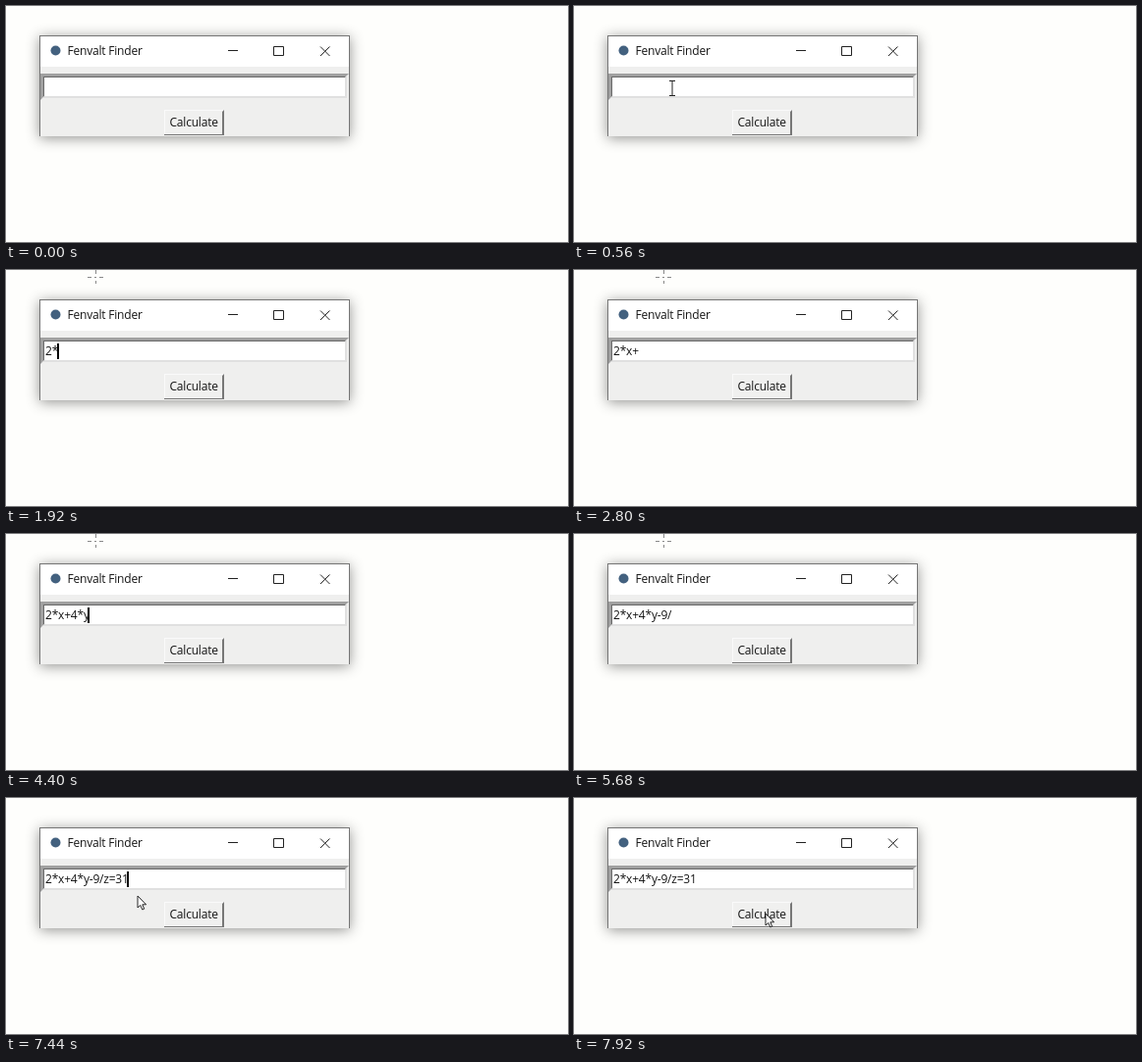
These frames come from a looping animation (572 by 241 pixels, 8000 ms). An HTML page:

```html
<!DOCTYPE html>
<html lang="en">
<head>
<meta charset="utf-8">
<title>Equation window</title>
<style>
  html, body { margin: 0; width: 100%; height: 100%; overflow: hidden; background: #fefefc; }
  svg { display: block; width: 572px; height: 241px; }
  text { font: 12px "Open Sans", "Noto Sans", sans-serif; letter-spacing: -.2px; fill: #151515; white-space: pre; }
  .label { font-weight: 500; }
  .shadow { filter: drop-shadow(0 2px 7px rgba(0, 0, 0, .42)); }
  .line { fill: none; stroke: #222; }
</style>
</head>
<body>
<svg viewBox="0 0 572 241">
  <!-- window -->
  <rect class="shadow" x="34" y="30" width="316" height="103" fill="#757575"/>
  <rect x="35" y="31" width="314" height="31" fill="#fff"/>
  <rect x="35" y="62" width="314" height="71" fill="#efefee"/>
  <circle cx="50.5" cy="45.5" r="5" fill="#43617f"/>
  <text x="62.5" y="50">Fenvalt Finder</text>
  <path class="line" d="M226 45.5h10M272.5 41.5h10v9h-10zM320 41.500l9.500 9.500M329.500 41.500l-9.500 9.500"/>

  <!-- entry -->
  <path fill="#a0a0a0" d="M35 69H349L345 73H39V92L35 96Z"/>
  <path fill="#696969" d="M38 72H346L345 73H39V92L38 93Z"/>
  <path fill="#e0e0e0" d="M347 71V94H37L39 92H345V73Z"/>
  <rect x="39" y="73" width="306" height="19" fill="#fff"/>
  <text id="entry" x="40" y="87"></text>
  <rect id="caret" y="75" width="2" height="16" fill="#000"/>

  <!-- button -->
  <rect x="161" y="106" width="61" height="26" fill="#777"/>
  <path fill="#fafafa" d="M161 106H222L220 108V131H161Z"/>
  <rect x="162" y="107" width="58" height="24" fill="#f0f0ef"/>
  <text class="label" x="166.500" y="123">Calculate</text>

  <!-- pointers -->
  <path id="cross" class="line" style="stroke: #888" d="M-8 .5h4M4 .5h4M.5-7v4M.5 4v3M-1 .5h2"/>
  <path id="beam" class="line" d="M-3-7.500H3M0-7V7M-3 7.500H3"/>
  <path id="arrow" d="M0 0V12L2.800 9.500 4.800 14 6.700 13.200 4.800 8.800H8.600Z"
        fill="#fff" stroke="#111" stroke-width=".9"/>
</svg>
<script>
  const LOOP = 8000, STEP = 80;
  const FIRST_KEY = 1360, KEY_GAP = 440;
  const BLINK = 720, BLINK_OFF = 240, BLINK_LEAD = 160;
  const formula = "2*x+4*y-9/z=31";
  // the pointer leaves the entry, rests above the window, dips below it and returns to the button
  const path = [
    { t: 560, x: 100, y: 84 }, { t: 880, x: 88, y: 25 }, { t: 1040, x: 87, y: 23 }, { t: 1200, x: 91, y: 7 },
    { t: 7280, x: 91, y: 7 }, { t: 7600, x: 177, y: 193 }, { t: 7920, x: 195, y: 118 }
  ];
  const el = id => document.getElementById(id);
  const entry = el("entry"), caret = el("caret");
  const pointers = ["cross", "beam", "arrow"].map(el);
  const ease = k => k * k * (3 - 2 * k);
  const mix = (a, b, k) => Math.round(a + (b - a) * k);

  function place(t) {
    const i = path.findIndex(p => p.t > t);
    if (i < 0) return path[path.length - 1];
    const a = path[i - 1], b = path[i];
    const k = ease((t - a.t) / (b.t - a.t));
    return { x: mix(a.x, b.x, k), y: mix(a.y, b.y, k) };
  }

  function kind({ x, y }) {
    if (x < 34 || x > 350 || y < 30 || y > 133) return "cross";
    return y > 69 && y < 96 ? "beam" : "arrow";
  }

  function draw(t) {
    const typed = Math.max(0, Math.floor((t - FIRST_KEY) / KEY_GAP) + 1);
    entry.textContent = formula.slice(0, typed);
    const width = typed ? entry.getComputedTextLength() : 0;
    caret.setAttribute("x", Math.round(38.6 + width));
    caret.style.opacity = (t + BLINK_LEAD) % BLINK >= BLINK_OFF ? 1 : 0;

    const pos = t < path[0].t ? null : place(t);
    for (const p of pointers) {
      const shown = pos && p.id === kind(pos);
      p.style.display = shown ? "" : "none";
      if (shown) p.setAttribute("transform", `translate(${pos.x} ${pos.y})`);
    }
  }

  const start = performance.now();
  function tick() {
    const t = (performance.now() - start) % LOOP;
    draw(Math.floor(t / STEP) * STEP);
    requestAnimationFrame(tick);
  }
  tick();
</script>
</body>
</html>
```
